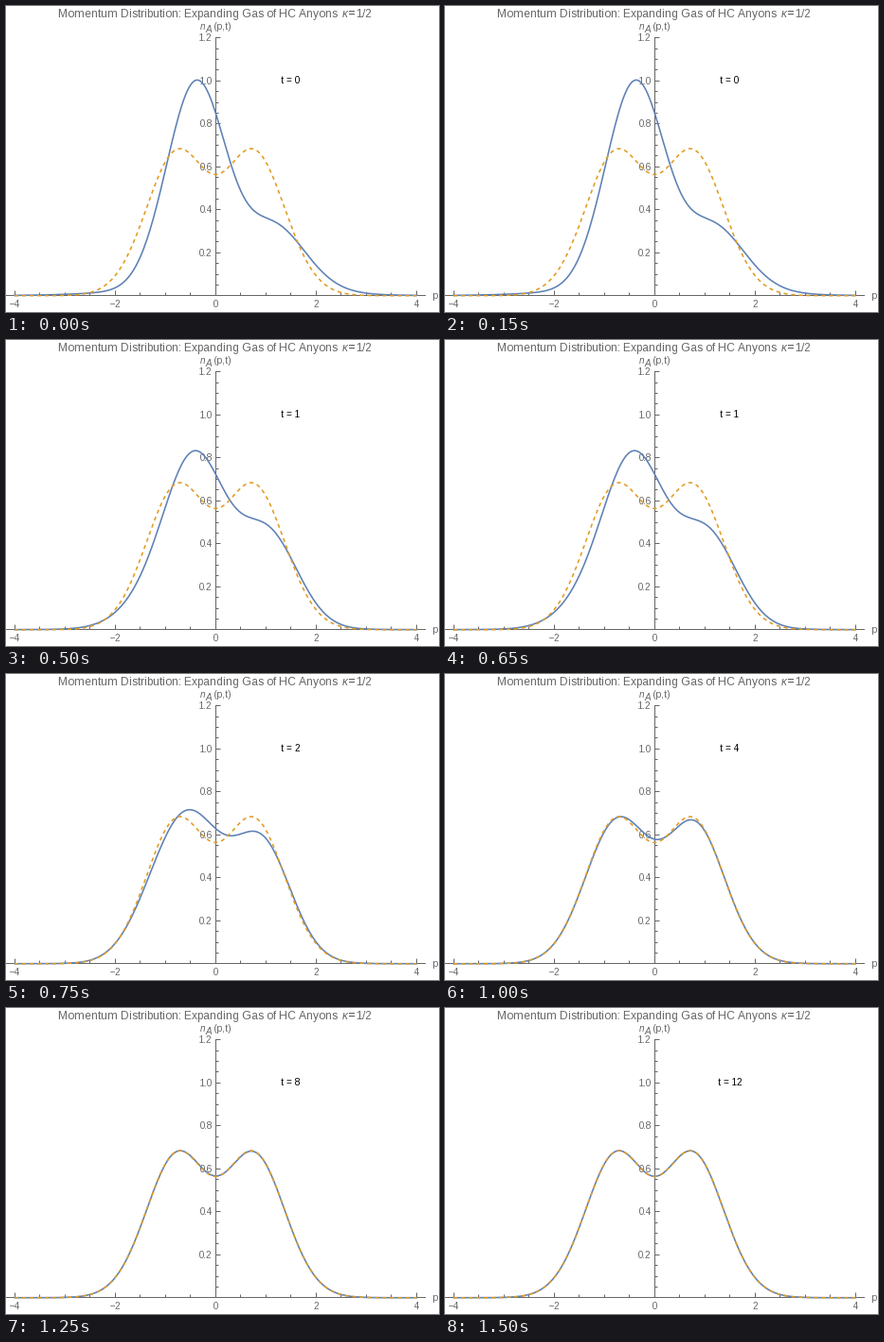
A matplotlib script for the animation above (1.75 s loop, 457 px wide and 324 px high).

```python
import numpy as np
import matplotlib.pyplot as plt
from matplotlib.animation import FuncAnimation

W, H, DPI = 457, 324, 64
X0, Y0 = 221.2, 306.75     # plot origin in pixels
SX, SY = 53.05, 227.5      # pixels per unit
GRAY, BLUE, GOLD = "#666666", "#5e81b5", "#e19c24"
TIMES = [0, 0.5, 1, 2, 4, 8, 12]
KAPPA = 0.5

plt.rcParams.update({
    "font.family": "Liberation Sans",
    "text.hinting": "force_autohint",
    "text.hinting_factor": 1,
})


def px(x):
    return X0 + SX * x


def py(y):
    return Y0 - SY * y


def pt(pixels):
    return pixels * 72 / DPI


def mid(v):
    """Centre of the pixel that holds v."""
    return np.floor(v) + 0.5


p = np.linspace(-4, 4, 241)
u = np.linspace(-5, 5, 1001)
w = np.linspace(-4.5, 4.5, 121)

# Two hard-core anyons in the harmonic ground state, in scaled coordinates
gap = u[:, None] - w
pair = np.abs(gap) * np.exp(-(u[:, None]**2 + w**2) / 2) / np.sqrt(np.pi)
pair = pair * np.exp(-0.5j * np.pi * KAPPA * np.sign(gap))


def anyons(t):
    """Momentum density after free expansion for a time t."""
    b = np.sqrt(1 + t * t)
    kernel = np.exp(1j * (u**2 * t / 2 - b * np.outer(p, u)))
    amp = kernel @ pair * (u[1] - u[0])
    return b / np.pi * (np.abs(amp)**2).sum(axis=1) * (w[1] - w[0])


def fermions():
    return (1 + 2 * p**2) * np.exp(-p**2) / np.sqrt(np.pi)


fig = plt.figure(figsize=(W / DPI, H / DPI), dpi=DPI, facecolor="white")
ax = fig.add_axes([0, 0, 1, 1])
ax.set(xlim=(0, W), ylim=(H, 0))
ax.axis("off")


def rule(xs, ys):
    ax.plot(xs, ys, color=GRAY, lw=pt(1), solid_capstyle="butt",
            snap=False, zorder=1)


def label(x, y, s, size=10, ha="left", color=GRAY, **kw):
    return ax.text(x, y, s, fontsize=pt(size), ha=ha, va="baseline",
                   color=color, **kw)


# Axes with ticks
left, base = mid(X0), mid(Y0)
rule([0, 443], [base, base])
rule([left, left], [33, base])
for i in range(-8, 9):
    x = mid(px(i / 2))
    major = i % 4 == 0
    rule([x, x], [base, base - (5 if major else 3)])
    if major:
        label(x, 319, str(i // 2).replace("-", "\u2212"), ha="center")
for i in range(1, 25):
    y = mid(py(i / 20))
    major = i % 4 == 0
    rule([left, left + (5 if major else 3)], [y, y])
    if major:
        label(218, y + 3.5, f"{i / 20:.1f}", ha="right")

# Titles
label(55, 12, "Momentum Distribution: Expanding Gas of HC Anyons", 12)
label(355, 12, "\u03ba", 12, style="italic")
label(361, 12, "=", 12, weight="bold")
label(369, 12, "1/2", 12)
label(205, 25, "n", style="italic")
label(211, 28, "A", style="italic")
label(219, 25, "(p,t)")
label(450, 310, "p")

clock = label(300.5, 82, "", ha="center", color="black")
curve, = ax.plot([], [], color=BLUE, lw=pt(1.6), zorder=3)
ax.plot(px(p), py(fermions()), color=GOLD, lw=pt(1.6), zorder=4,
        dashes=(2.6, 2.4), dash_capstyle="butt")
densities = [anyons(t) for t in TIMES]


def draw(i):
    curve.set_data(px(p), py(densities[i]))
    clock.set_text(f"t = {TIMES[i]}")
    return curve, clock


anim = FuncAnimation(fig, draw, frames=len(TIMES), interval=250,
                     repeat=True, repeat_delay=0, blit=False)
plt.show()
```
